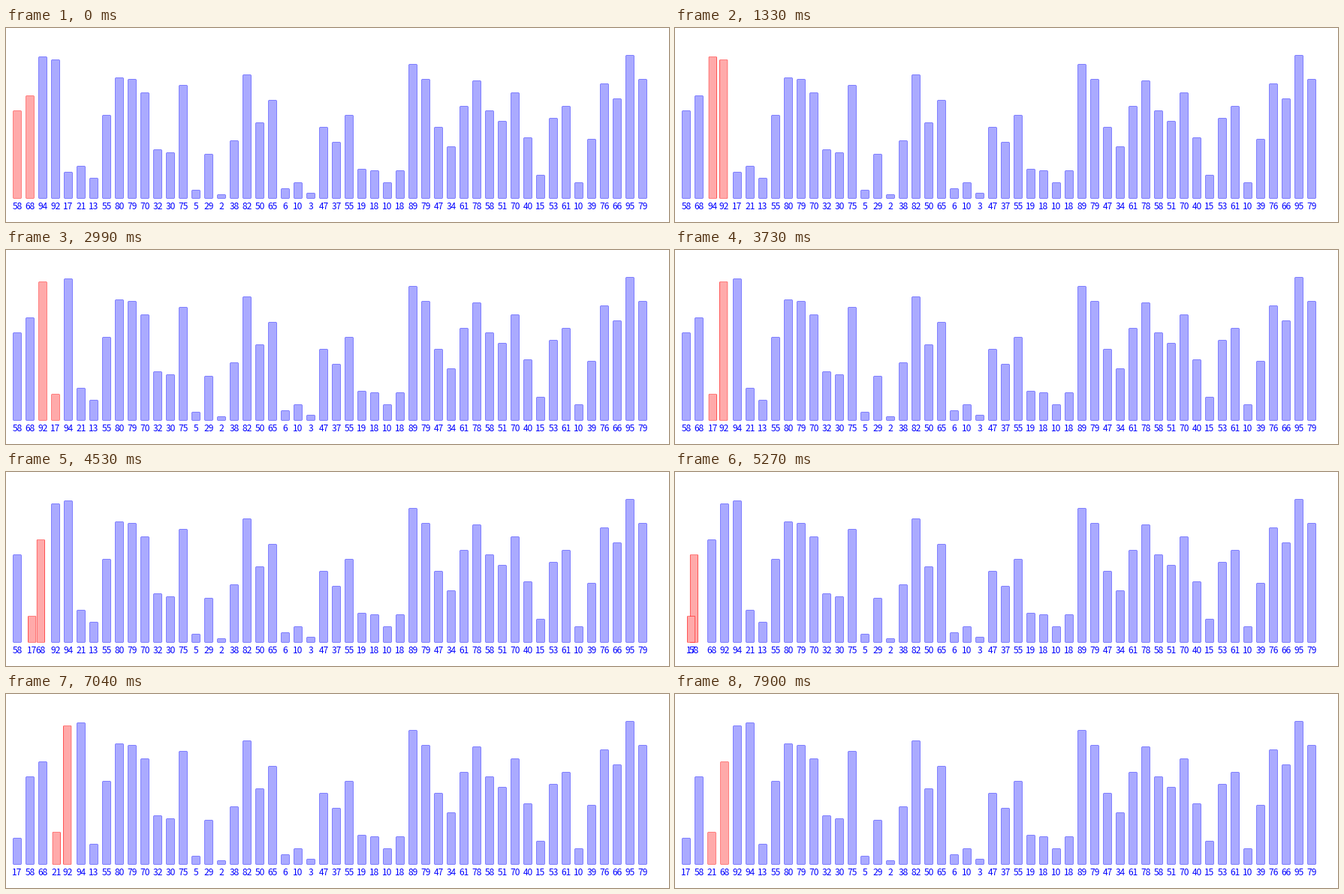
Animation, 883 px wide and 259 px high, one loop 8 s. Source, as a matplotlib script:

```python
import matplotlib.pyplot as plt
import numpy as np
from itertools import islice
from matplotlib.animation import FuncAnimation
from matplotlib.collections import PolyCollection

WIDTH, HEIGHT, DPI = 883, 259, 64
PX = 72 / DPI                     # one pixel in points
LOOP_MS, INTERVAL = 8000, 20

VALUES = [58, 68, 94, 92, 17, 21, 13, 55, 80, 79, 70, 32, 30, 75, 5, 29, 2,
          38, 82, 50, 65, 6, 10, 3, 47, 37, 55, 19, 18, 10, 18, 89, 79, 47,
          34, 61, 78, 58, 51, 70, 40, 15, 53, 61, 10, 39, 76, 66, 95, 79]
COUNT = len(VALUES)

FIRST_X, SPACING, BAR_W = 15, 17, 10
BASE_Y, LABEL_Y, SCALE = 227, 242, 2

# The sort runs on an even clock; the picture refreshes only at these times.
STEP_START, STEP_MS, TICKS = 47, 413.5, 13
REFRESH = [0, 500, 930, 1330, 1460, 1590, 1720, 2250, 2690, 2840, 2990,
           3420, 3570, 3730, 3880, 4250, 4390, 4530, 4680, 5120, 5270, 5420,
           5570, 6000, 6120, 6240, 6360, 6760, 6900, 7040, 7190, 7620, 7760,
           7900]

BLUE, RED = ("#0000ff", "#aaaaff"), ("#ff0000", "#ffaaaa")
CLEAR = (0, 0, 0, 0)


def insertion_sort():
    """Yield (order, left slot, is_swap) for every compare and swap."""
    order = list(range(COUNT))
    for i in range(1, COUNT):
        for j in range(i - 1, -1, -1):
            yield order[:], j, False
            if VALUES[order[j]] <= VALUES[order[j + 1]]:
                break
            yield order[:], j, True
            order[j], order[j + 1] = order[j + 1], order[j]


STEPS = list(islice(insertion_sort(), int(LOOP_MS / STEP_MS) + 1))


def state_at(ms):
    """Return the bar centres and the two active bars."""
    shown = max(t for t in REFRESH if t <= ms)
    clock = max(0, (shown - STEP_START) / STEP_MS)
    order, left, is_swap = STEPS[int(clock)]
    centres = np.empty(COUNT)
    centres[order] = FIRST_X + SPACING * np.arange(COUNT)
    pair = order[left:left + 2]
    if is_swap:
        shift = SPACING * round(clock % 1 * TICKS) / TICKS
        centres[pair] += [shift, -shift]
    return centres, pair


def bar_outline(centre, value):
    x0, x1 = centre - BAR_W / 2, centre + BAR_W / 2
    top = BASE_Y - SCALE * value
    return [(x0, BASE_Y), (x0, top), (x1, top), (x1, BASE_Y)]


fig = plt.figure(figsize=(WIDTH / DPI, HEIGHT / DPI), dpi=DPI,
                 facecolor="white")
ax = fig.add_axes([0, 0, 1, 1])
ax.set_xlim(0, WIDTH)
ax.set_ylim(HEIGHT, 0)
ax.axis("off")

# Each bar is a stroke followed by a fill that hides the stroke's inner half.
bars = PolyCollection([], linewidths=[PX, 0], snap=False)
ax.add_collection(bars, autolim=False)
labels = [ax.text(0, LABEL_Y, str(v), color=BLUE[0], fontsize=12 * PX,
                  family="Noto Sans CJK JP", ha="center", va="baseline")
          for v in VALUES]


def update(frame):
    centres, active = state_at((frame + 0.5) * INTERVAL)
    verts, edges, faces = [], [], []
    for i, (centre, value) in enumerate(zip(centres, VALUES)):
        stroke, fill = RED if i in active else BLUE
        verts += [bar_outline(centre, value)] * 2
        edges += [stroke, CLEAR]
        faces += [CLEAR, fill]
        labels[i].set_x(centre)
    bars.set_verts(verts)
    bars.set_edgecolor(edges)
    bars.set_facecolor(faces)
    return [bars, *labels]


anim = FuncAnimation(fig, update, frames=LOOP_MS // INTERVAL,
                     init_func=lambda: update(0), interval=INTERVAL,
                     repeat=True, repeat_delay=0, blit=False)
plt.show()
```
